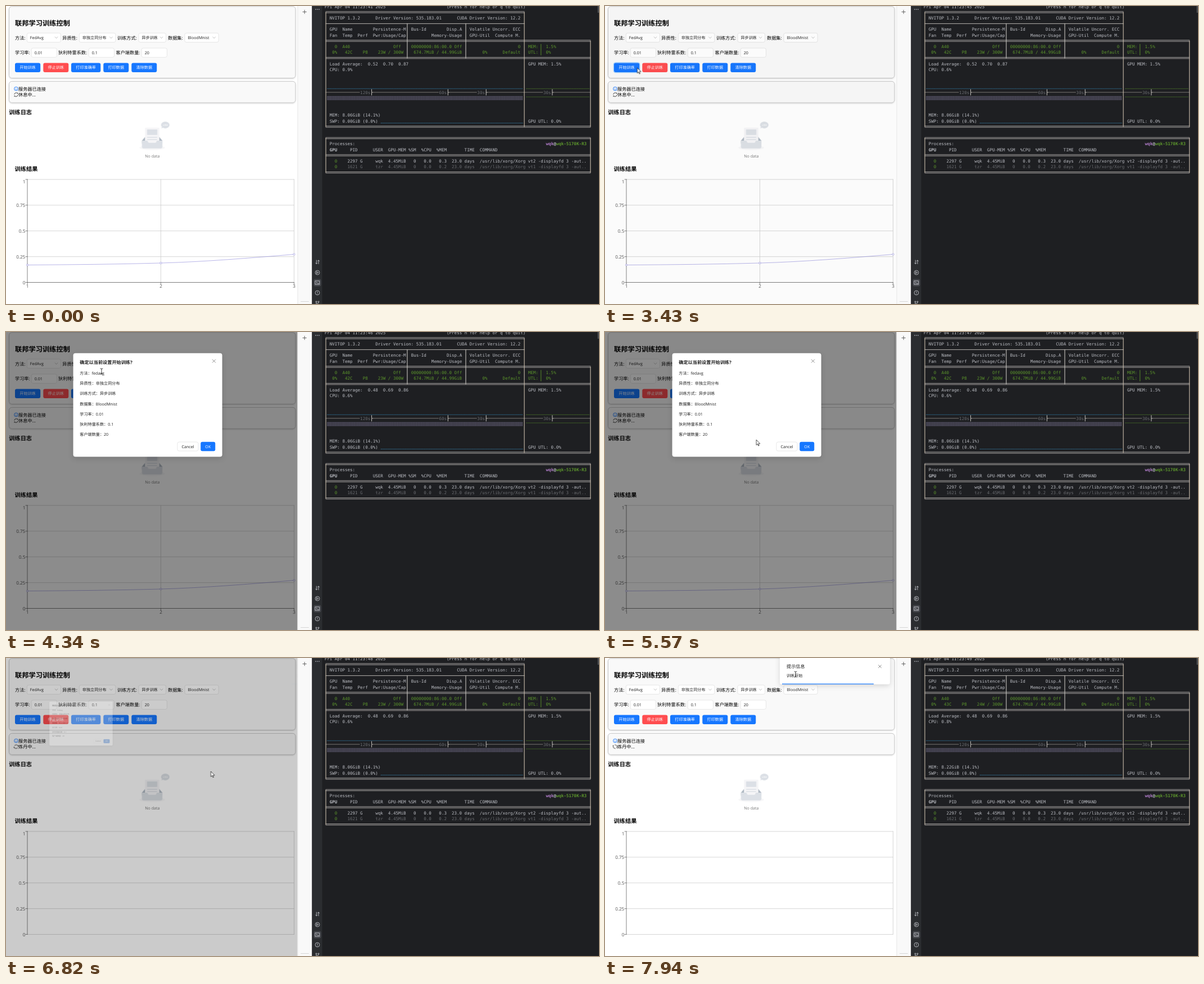
An HTML page for the animation above (8 s loop, 1055 by 531 pixels).

```html
<!DOCTYPE html>
<html lang="zh-CN">
<head>
<meta charset="utf-8">
<title>联邦学习训练控制</title>
<style>
html, body { margin: 0; width: 100%; height: 100%; overflow: hidden; background: #fff; }
svg { display: block; }
text { font-family: "Open Sans", "Noto Sans CJK SC", "Noto Sans CJK", sans-serif; white-space: pre; text-rendering: geometricPrecision; }
.term text { font: 7.52px "DejaVu Sans Mono", monospace; }
.term .b { font-weight: bold; }
.mid { text-anchor: middle; }
.end { text-anchor: end; }
.line { fill: none; stroke-linecap: round; stroke-linejoin: round; }

#mask, #modal, #toast, #bar, #cursor, #arrow, #beam, #spin {
  animation: 8s linear infinite;
}
#mask { animation-name: mask; }
#modal { animation-name: modal; transform-origin: 46px 107px; }
#toast { animation-name: toast; }
#bar { animation-name: bar; transform-origin: 315px 46px; }
#cursor { animation-name: cursor; }
#arrow { animation-name: arrow; animation-timing-function: step-end; }
#beam { animation-name: beam; animation-timing-function: step-end; }
#spin { animation-name: spin; transform-origin: 18px 158px; }

@keyframes mask {
  0%, 42.79% { opacity: 0; }
  45.29%, 83.9% { opacity: .45; }
  86.4%, 100% { opacity: 0; }
}
@keyframes modal {
  0% { transform: scale(.2); opacity: 0; }
  43.61% { transform: scale(.2); opacity: 0; animation-timing-function: cubic-bezier(.08, .82, .17, 1); }
  46.11% { transform: none; opacity: 1; }
  83.91% { transform: none; opacity: 1; animation-timing-function: cubic-bezier(.78, .14, .15, .86); }
  86.41%, 100% { transform: scale(.2); opacity: 0; }
}
@keyframes toast {
  0% { transform: translateX(196px); opacity: 0; }
  85% { transform: translateX(196px); opacity: 0; animation-timing-function: cubic-bezier(.645, .045, .355, 1); }
  87.5%, 100% { transform: none; opacity: 1; }
}
@keyframes bar {
  0%, 85.5% { transform: none; }
  93%, 100% { transform: scaleX(.867); }
}
@keyframes spin {
  0%, 84.4% { transform: none; }
  100% { transform: rotate(450deg); }
}
@keyframes arrow {
  0% { visibility: visible; }
  51.5% { visibility: hidden; }
  62% { visibility: visible; }
  93.5%, 100% { visibility: hidden; }
}
@keyframes beam {
  0% { visibility: hidden; }
  51.5% { visibility: visible; }
  62% { visibility: hidden; }
  93.5%, 100% { visibility: visible; }
}
@keyframes cursor {
  0%, .86% { transform: translate(853px, 451px); opacity: 0; }
  .87% { transform: translate(853px, 451px); opacity: 1; }
  2.5% { transform: translate(700px, 330px); }
  4.2% { transform: translate(480px, 220px); }
  5.9%, 8.4% { transform: translate(391px, 190px); }
  10.1%, 13.4% { transform: translate(377px, 186px); }
  15.5% { transform: translate(180px, 150px); }
  17.6%, 21% { transform: translate(26px, 104px); }
  23% { transform: translate(6px, 108px); }
  26% { transform: translate(30px, 104px); }
  30.5%, 31.3% { transform: translate(41px, 107px); }
  31.4%, 42% { transform: translate(46px, 107px); }
  42.88% { transform: translate(57px, 110px); }
  44.63% { transform: translate(154px, 128px); }
  47% { transform: translate(190px, 110px); }
  49.1% { transform: translate(199px, 95px); }
  50.9%, 52.6% { transform: translate(178px, 70px); }
  54.25%, 55.9% { transform: translate(170px, 70px); }
  58% { transform: translate(178px, 100px); }
  61.9% { transform: translate(188px, 138px); }
  65% { transform: translate(205px, 150px); }
  69% { transform: translate(260px, 190px); }
  72.2% { transform: translate(306px, 200px); }
  75.75%, 86% { transform: translate(364.5px, 202px); }
  90.5% { transform: translate(352px, 60px); }
  94% { transform: translate(341px, 33px); }
  99.2%, 100% { transform: translate(339px, 29px); opacity: 1; }
}
</style>
</head>
<body>
<svg id="stage" width="1055" height="531" viewBox="0 0 1055 531"></svg>
<script>
const SMALL = 7.14, BASE = 8.16;
const BLUE = '#1677ff', RED = '#ff4d4f', INK = '#000000e0';

const text = (x, y, str, size = SMALL, attrs = '') =>
  `<text x="${x}" y="${y + size * .37}" font-size="${size}" ${attrs}>${str}</text>`;
const rect = (x, y, w, h, fill, attrs = '') =>
  `<rect x="${x}" y="${y}" width="${w}" height="${h}" fill="${fill}" ${attrs}/>`;
const path = (d, stroke, width = 1, attrs = '') =>
  `<path class="line" d="${d}" stroke="${stroke}" stroke-width="${width}" ${attrs}/>`;
const cross = (x, y, r) =>
  path(`M${x - r} ${y - r}l${2 * r} ${2 * r}m0 ${-2 * r}l${-2 * r} ${2 * r}`, '#777', .8);

// Control page
const card = (y, h) => rect(5.5, y, 509.5, h, '#f9f9f9', 'rx="5" stroke="#c6c6c6" filter="url(#soft)"');
const field = (x, y, w, str) =>
  rect(x, y, w, 16.4, '#fff', 'rx="3" stroke="#d9d9d9" stroke-width=".6"') + text(x + 5.5, y + 8.5, str, SMALL, `fill="${INK}"`);
const select = (x, w, str) =>
  field(x, 48.2, w, str) + path(`M${x + w - 10.3} 55l2.3 2.6l2.3-2.6`, '#aaa', .7);
const button = (x, w, str, fill = BLUE) =>
  rect(x, 101.5, w, 16.5, fill, 'rx="3"') + text(x + w / 2, 109.8, str, SMALL, 'class="mid" fill="#fff"');

const controls = () =>
  card(.8, 127.6) + card(134.3, 38) +
  text(16, 30, '联邦学习训练控制', 12.24, 'font-weight="700"') +
  text(16, 56.5, '方法:', BASE) + select(37.3, 60.2, 'FedAvg') +
  text(100.3, 56.5, '异质性:', BASE) + select(130.3, 64.7, '非独立同分布') +
  text(198, 56.5, '训练方式:', BASE) + select(236, 48.6, '异步训练') +
  text(288, 56.5, '数据集:', BASE) + select(318, 60.2, 'BloodMnist') +
  text(16, 83.2, '学习率:', BASE) + field(45.2, 75, 45.3, '0.01') +
  text(93, 83.2, '狄利特雷系数:', BASE) + field(147.2, 75, 45.3, '0.1') +
  text(195.5, 83.2, '客户端数量:', BASE) + field(241.2, 75, 45.3, '20') +
  rect(15.2, 100.7, 46.8, 18.1, 'none', 'id="ring" rx="3.5" stroke="#91caff"') +
  button(16, 45.2, '开始训练') + button(66.3, 45, '停止训练', RED) + button(116, 52.3, '打印准确率') +
  button(173.3, 45, '打印数据') + button(223.3, 45, '清除数据');

const status = () =>
  `<circle cx="18" cy="147.5" r="3.5" fill="none" stroke="${BLUE}" stroke-width=".8"/>` +
  path('M16 148.3q2 2.4 4 0M16.6 146.2v.3M19.4 146.2v.3', BLUE, .7) +
  text(22, 147.8, '服务器已连接', BASE) +
  `<g id="spin">${path('M14.8 157.2a3.4 3.4 0 0 1 6.2-.9v-1.5M21.2 158.8a3.4 3.4 0 0 1-6.2 .9v1.5', '#111', .8)}</g>` +
  text(22, 158.3, '', BASE, 'id="state"');

const emptyBox = () =>
  `<g transform="translate(229.2 206) scale(.3355)">
    <ellipse cx="91.8" cy="138.6" rx="67.8" ry="12.7" fill="#f5f5f7" opacity=".8"/>
    <path d="M146 101.3L122 72q-2-2-4.6-2.3H66q-2.6 .3-4.6 2.3L37.6 101.3V117H146z" fill="#aeb8c2"/>
    ${rect(53.8, 31.7, 76, 101.3, '#f5f5f7', 'rx="4"')}
    ${rect(64.7, 41.6, 54.2, 29, '#dce0e6', 'rx="2"')}
    ${rect(64.7, 81.4, 54.2, 4.5, '#dce0e6', 'rx="2"')}
    ${rect(64.7, 93.2, 54.2, 4.5, '#dce0e6', 'rx="2"')}
    <path d="M37.6 101.3H64q5 0 5 5.5q0 5.4 5.3 5.4H109q5.3 0 5.3-5.4q0-5.5 5.2-5.5H146V135q-1 7-7 7H44.5q-6 0-7-7z" fill="#dce0e6"/>
    <ellipse cx="161.4" cy="18.1" rx="22.6" ry="18.1" fill="#dce0e6"/>
    <path d="M143 28l-2 8l9-3z" fill="#dce0e6"/>
    <path d="M155.3 21h-5.7l2.9-5zM159 16h5v5h-5z" fill="#fff"/>
    <circle cx="170.3" cy="18.5" r="2.8" fill="#fff"/>
  </g>` + text(260.3, 267.5, 'No data', SMALL, 'class="mid" fill="#777"');

const chart = () => {
  const bottom = 492.5, top = 309, left = 38, mid = 275.5, right = 512.5;
  const yOf = v => bottom - v * (bottom - top);
  const levels = [0, .25, .5, .75, 1];
  const grid = levels.map(v => `M${left} ${yOf(v)}H${right}`).join('') + `M${right} ${top}V${bottom}`;
  const ticks = levels.map(v => `M${left - 3} ${yOf(v)}h3`).join('') + `M${left} ${top}V${bottom}`;
  const yLabels = levels.map(v => text(34.3, Math.max(yOf(v), 312.5), v, BASE, 'class="end" fill="#555"')).join('');
  const points = [[left, 461.5], [mid, 458], [right, 442.5]];
  return path(grid, '#ccc', .8) + path(ticks, '#666', .8) + yLabels +
    '<g id="series">' + path(`M${mid} ${top}V${bottom}`, '#ccc', .8) +
    path(`M${left} ${bottom}H${right}` + points.map(p => `M${p[0]} ${bottom}v3`).join(''), '#666', .8) +
    points.map((p, i) => text(p[0], 499.3, i + 1, BASE, 'class="mid" fill="#555"')).join('') +
    path('M38 461.5C117.2 460.9 196.3 460.3 275.5 458C354.5 455.7 433.5 449.1 512.5 442.5', '#8884d8', .6) +
    points.map(p => `<circle cx="${p[0]}" cy="${p[1]}" r="1.6" fill="#fff" stroke="#8884d8" stroke-width=".6"/>`).join('') +
    '</g>';
};

const modal = () => {
  const lines = ['方法：fedavg', '异质性：非独立同分布', '训练方式：异步训练', '数据集：BloodMnist',
    '学习率：0.01', '狄利特雷系数：0.1', '客户端数量：20'];
  return `<g id="modal" fill="${INK}">` +
    rect(119.6, 37.8, 265, 184.5, '#fff', 'rx="4" filter="url(#lift)"') +
    text(131.3, 54, '确定以当前设置开始训练?', BASE, 'font-weight="700"') + cross(370, 51.7, 2.7) +
    lines.map((s, i) => text(131.3, 73 + i * 18.3, s)).join('') +
    rect(305, 196, 37, 16, '#fff', 'rx="3" stroke="#d9d9d9" stroke-width=".6"') +
    text(323.5, 204, 'Cancel', SMALL, 'class="mid"') +
    rect(346.3, 195.7, 26, 16.5, BLUE, 'id="ok" rx="3"') +
    text(359.3, 204, 'OK', SMALL, 'class="mid" fill="#fff"') + '</g>';
};

const toast = () => '<g id="toast">' +
  rect(311, -6, 196, 52.8, '#fff', 'rx="4" filter="url(#lift)"') +
  text(323, 15, '提示信息', BASE, `fill="${INK}"`) + text(323, 31, '训练开始', SMALL, `fill="${INK}"`) +
  cross(489, 15, 2.5) + rect(315, 45.7, 188, 1.2, BLUE, 'id="bar"') + '</g>';

// Terminal: one cell is CELL by ROW, column 0 starts at X0
const CELL = 4.527, ROW = 10.2, X0 = 566.74;
const EDGE = '#cdbfae', RULE = '#c8c5c0', FG = '#bcbec4', GREEN = '#5c962c', DIM = '#6a6c70';
const rowY = r => .8 + r * ROW;
const colX = c => X0 + (c + .5) * CELL;
const cell = (r, c, str, fill = FG, attrs = '') =>
  `<text x="${X0 + c * CELL}" y="${rowY(r) + 2.7}" fill="${fill}" ${attrs}>${str}</text>`;
const column = (c, from, to, color = EDGE) => path(`M${colX(c)} ${rowY(from)}V${rowY(to)}`, color, 1.1);
const double = (r, to) => [-1.1, 1.1].map(d => path(`M${colX(0)} ${rowY(r) + d}H${colX(to)}`, RULE, .8)).join('');
const dots = (x1, x2, y, color) =>
  `<path d="M${x1} ${y}H${x2}" stroke="${color}" stroke-width="1" stroke-dasharray="1.1 1.163"/>`;

const axis = () => {
  const marks = [[18, '120s'], [48, '60s'], [63, '30s'], [89, '30s']];
  const gray = '#85817b';
  let from = 0, out = '';
  for (const [col, label] of marks) {
    const labelCol = col - label.length;
    out += path(`M${colX(from)} ${rowY(15)}H${X0 + labelCol * CELL - 1}`, gray, .9) +
      cell(15, labelCol, label, DIM) + path(`M${colX(col)} ${rowY(14.5)}v${ROW}m0 ${-ROW / 2}h2`, RULE, 1);
    from = col;
  }
  return out + path(`M${colX(from)} ${rowY(15)}H${colX(104)}`, gray, .9);
};

const terminal = () => {
  const sky = '#3590c4';
  return '<g class="term">' + rect(563, 0, 492, 531, '#1e1f22') + rect(1052.5, 0, 2.5, 12, '#4a4c50') +
    cell(0, 0, '', FG, 'id="clock"') + cell(0, 48, '(Press h for help or q to quit)') +
    cell(2, 2, 'NVITOP 1.3.2') + cell(2, 20, 'Driver Version: 535.183.01') + cell(2, 52, 'CUDA Driver Version: 12.2') +
    cell(4, 2, 'GPU  Name        Persistence-M') + cell(4, 34, 'Bus-Id        Disp.A') + cell(4, 57, 'Volatile Uncorr. ECC') +
    cell(5, 2, 'Fan  Temp  Perf  Pwr:Usage/Cap') + cell(5, 42, 'Memory-Usage') + cell(5, 57, 'GPU-Util  Compute M.') +
    cell(7, 4, '0  A40                 Off', GREEN) + cell(7, 34, '00000000:86:00.0 Off', GREEN) + cell(7, 76, '0', GREEN) +
    cell(8, 3, '0%', GREEN) + cell(8, 8, '', GREEN, 'id="power"') + cell(8, 35, '674.7MiB / 44.99GiB', GREEN) +
    cell(8, 62, '0%      Default', GREEN) +
    cell(7, 80, 'MEM:   1.5%', GREEN) + cell(8, 80, 'UTL:   0%', GREEN) + path(`M951.8 ${rowY(6.6)}V${rowY(8.5)}`, GREEN, .9) +
    cell(10, 2, '', FG, 'id="load"') + cell(11, 2, '', FG, 'id="cpu"') + cell(10, 80, 'GPU MEM: 1.5%') +
    cell(19, 2, '', FG, 'id="mem"') + cell(20, 2, 'SWP: 0.00GiB (0.0%)') + cell(20, 80, 'GPU UTL: 0.0%') +
    dots(571.5, 920, 147.3, sky) + dots(925.5, 1038, 147.3, GREEN) +
    [161.2, 163.1, 165, 166.9].map(y => dots(571.5, 920, y, '#a99fcb')).join('') +
    dots(925.5, 1038, 162, GREEN) + dots(667, 920, 208.6, sky) + axis() +
    double(1, 78) + path(`M${colX(0)} ${rowY(3)}H${colX(78)}`, RULE, .9) +
    [6, 9, 21, 23, 26, 29].map(r => double(r, 104)).join('') +
    column(0, 1, 21) + column(78, 1, 21) + column(104, 6, 21) +
    column(32, 3, 9, RULE) + column(55, 3, 9, RULE) + column(0, 23, 29) + column(104, 23, 29) +
    cell(24, 2, 'Processes:') + cell(24, 87, 'wqk', '#b07cc8', 'class="b"') + cell(24, 90, '@', FG, 'class="b"') +
    cell(24, 91, 'wqk-5170K-R3', GREEN, 'class="b"') +
    cell(25, 2, 'GPU', FG, 'class="b"') + cell(25, 10, 'PID      USER  GPU-MEM %SM  %CPU  %MEM       TIME  COMMAND') +
    cell(27, 4, '0', GREEN) + cell(28, 4, '0', GREEN) +
    cell(27, 9, '2297 G     wqk  4.45MiB   0   0.0   0.3  23.0 days  /usr/lib/xorg/Xorg vt2 -displayfd 3 -aut..') +
    cell(28, 9, '1621 G     tzr  4.45MiB   0   0.0   0.2  23.0 days  /usr/lib/xorg/Xorg vt1 -displayfd 3 -aut..', DIM) +
    '</g>';
};

const sidebars = () => {
  const icon = '#ced0d6';
  return rect(518.5, 0, 26.5, 531, '#f9f9f9') + path('M519 0V531', '#e4e4e4', .8) +
    path('M528 10.5h6.4m-3.2-3.2v6.4', '#444', .8) + path('M524.5 526.5h14', '#ccc', .8) +
    rect(544.5, 0, 19, 531, '#2b2d30') + path('M545 0V531M563 0V531', '#1e1f22', 1) +
    [551, 554, 557].map(x => `<circle cx="${x}" cy="6" r=".8" fill="${icon}"/>`).join('') +
    path('M552.3 453v6.5m-1.6-1.6l1.6 1.6l1.6-1.6M556 459.5v-6.5m-1.6 1.6l1.6-1.6l1.6 1.6', icon, .8) +
    rect(547.5, 486.5, 13, 13, '#43454a', 'rx="3"') +
    path('M550.3 489.8h7.4v6.4h-7.4zM552 491.5l1.5 1.4l-1.5 1.4M554.5 494.5h1.6', icon, .8) +
    [475, 511].map(y => `<circle cx="554" cy="${y}" r="3.9" fill="none" stroke="${icon}" stroke-width=".8"/>`).join('') +
    path('M552.9 473.3l3 1.7l-3 1.7zM554 509v2.3M554 513v.1', icon, .8) +
    path('M552 528v4M552 531q4 0 4-3', icon, .8) +
    [552, 556].map(x => `<circle cx="${x}" cy="527" r="1.1" fill="none" stroke="${icon}" stroke-width=".7"/>`).join('');
};

const pointer = () => `<g id="cursor">
  <path id="arrow" d="M0 0V9.5L2.2 7.5L3.7 10.9L5 10.3L3.6 7H6.6Z" fill="#fff" stroke="#000" stroke-width=".7"/>
  <path id="beam" class="line" d="M-2-5q2 0 2 1V4q0 1-2 1M2-5q-2 0-2 1M0 4q0 1 2 1" stroke="#111" stroke-width=".8"/>
</g>`;

const stage = document.getElementById('stage');
stage.innerHTML = `<defs>
    <filter id="soft"><feDropShadow dx="0" dy="1" stdDeviation="1.2" flood-opacity=".15"/></filter>
    <filter id="lift" x="-15%" y="-30%" width="130%" height="160%"><feDropShadow dx="0" dy="3" stdDeviation="5" flood-opacity=".14"/></filter>
    <clipPath id="page">${rect(0, 0, 518.5, 531, '#fff')}</clipPath>
  </defs>
  <g clip-path="url(#page)">` +
  rect(0, 0, 519, 531, '#fff') + controls() + status() +
  text(5.3, 189.5, '训练日志', 10.2, 'font-weight="700"') + emptyBox() +
  text(15.6, 290, '训练结果', 10.2, 'font-weight="700"') + chart() +
  rect(0, 0, 519, 531, '#000', 'id="mask"') + modal() + toast() + '</g>' +
  sidebars() + terminal() + pointer();

// Hard changes: each list holds [start in ms, value]
const readings = {
  cpu: [[0, 'CPU: 0.9%'], [1740, 'CPU: 0.6%'], [6890, 'CPU: 0.8%']],
  load: [[0, 'Load Average:  0.52  0.70  0.87'], [3800, 'Load Average:  0.48  0.69  0.86']],
  power: [[0, '42C    P8    23W / 300W'], [7300, '43C    P8    24W / 300W']],
  mem: [[0, 'MEM: 8.06GiB (14.1%)'], [7300, 'MEM: 8.22GiB (14.1%)']],
  state: [[0, '休息中...'], [6750, '炼丹中...']],
};
const el = id => document.getElementById(id);
const valueAt = (steps, t) => steps.filter(s => s[0] <= t).pop()[1];
const put = (id, str) => { if (el(id).textContent !== str) el(id).textContent = str; };

let start;
function draw(now) {
  start ??= now;
  const t = (now - start) % 8000;
  for (const id in readings) put(id, valueAt(readings[id], t));
  put('clock', `Fri Apr 04 11:23:${42 + Math.floor((t - 70) / 1032)} 2025`);
  el('series').style.display = t < 6530 ? '' : 'none';
  el('ring').style.display = t > 3330 && t < 3640 ? '' : 'none';
  el('ok').setAttribute('fill', t > 6000 ? '#1668dc' : BLUE);
  requestAnimationFrame(draw);
}
requestAnimationFrame(draw);
</script>
</body>
</html>
```
